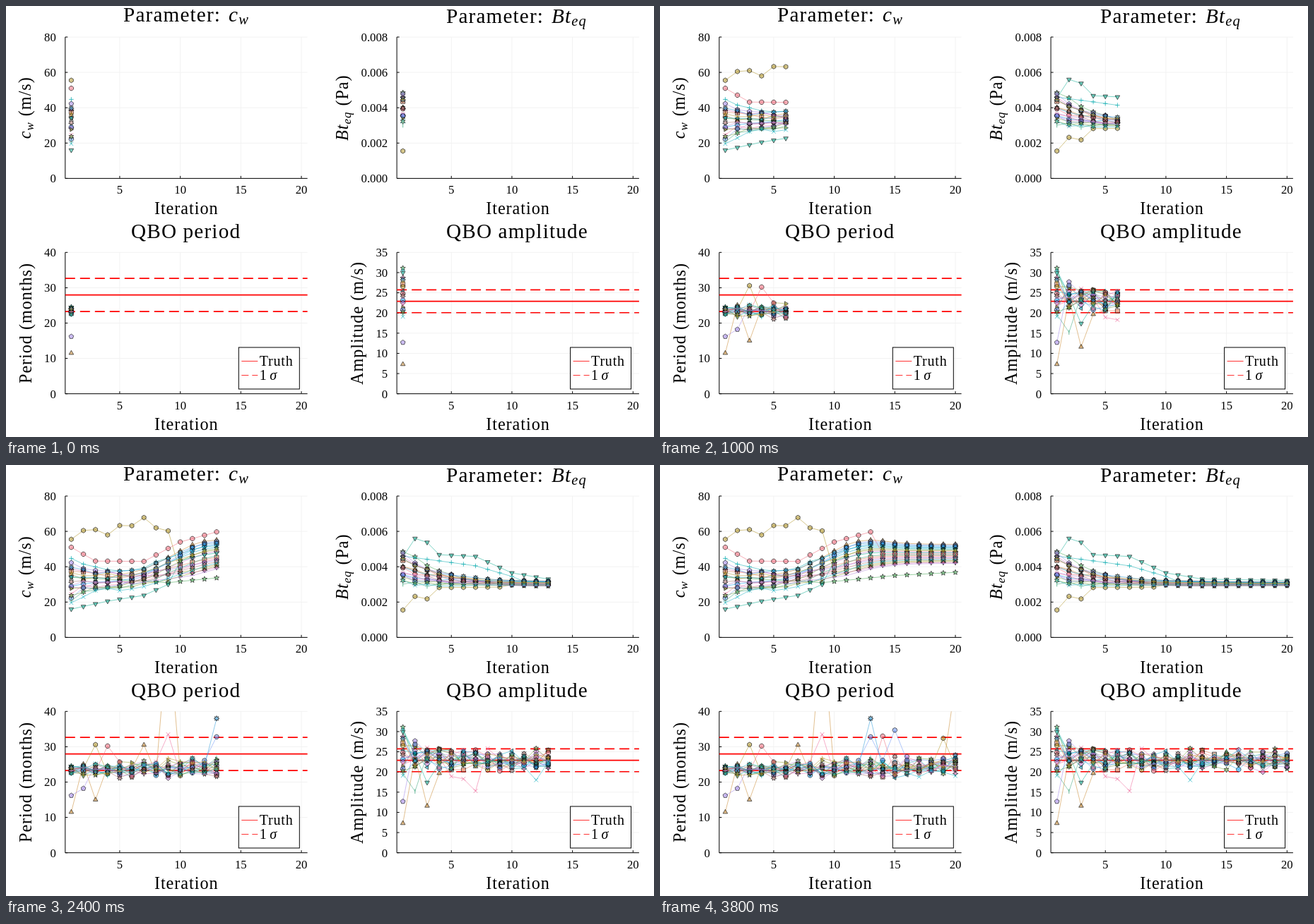
Write an HTML page that moves like this. It is 917x611 px and loops after 5800 ms.

```html
<!DOCTYPE html>
<html lang="en">
<head>
<meta charset="utf-8">
<title>Ensemble calibration</title>
<style>
html, body { margin: 0; width: 100%; height: 100%; overflow: hidden; background: #fff; }
svg { display: block; width: 917px; height: 611px; }
text { font-family: "Liberation Serif", serif; fill: #000; letter-spacing: .04em; }
.title { font-size: 29.2px; }
.label { font-size: 24.2px; text-anchor: middle; }
.tick { font-size: 16.7px; letter-spacing: 0; }
.legend { font-size: 20px; }
.math { font-style: italic; }
.sub { font-style: italic; font-size: .7em; }
</style>
</head>
<body>
<svg id="stage" viewBox="0 0 917 611"></svg>
<script>
const NS = 'http://www.w3.org/2000/svg';
const stage = document.getElementById('stage');
const STEPS = 20, STEP_MS = 200, LOOP_MS = 5800;
const W = 342.8, H = 200.4, LEFT = 83.8, RIGHT = 553.1, TOP = 44, LOW = 349.3;
const { PI, exp, min, max } = Math;

const clamp = v => min(1, max(0, v));
const ease = t => (t = clamp(t)) * t * (3 - 2 * t);
const decay = (n, rate) => exp((1 - n) / rate);

function polygon(count, r, turn = 0, inner = 1) {
  const total = inner < 1 ? count * 2 : count;
  return (x, y) => {
    const points = Array.from({ length: total }, (_, i) => {
      const a = turn - PI / 2 + i * 2 * PI / total;
      const q = i % 2 ? r * inner : r;
      return [(x + q * Math.cos(a)).toFixed(2), (y + q * Math.sin(a)).toFixed(2)];
    });
    return 'M' + points.join('L') + 'Z';
  };
}
const star = (count, inner) => polygon(count, 3.8, 0, inner);
const vbar = (x, y) => `M${x} ${y - 3.3}v6.6`;
const hbar = (x, y) => `M${x - 3.3} ${y}h6.6`;
const plus = (x, y) => vbar(x, y) + hbar(x, y);
const cross = (x, y) => `M${x - 2.8} ${y - 2.8}l5.6 5.6M${x - 2.8} ${y + 2.8}l5.6 -5.6`;
const open = [vbar, hbar, plus, cross];

const members = [
  ['circle', '#009af9', polygon(20, 3.3)],
  ['square', '#e26f46', polygon(4, 4.2, PI / 4)],
  ['star5', '#3da44d', star(5, .45)],
  ['diamond', '#c271d2', polygon(4, 3.7)],
  ['hexagon', '#ac8d18', polygon(6, 3.4)],
  ['plus', '#00a9ad', plus],
  ['cross', '#ed5e93', cross],
  ['up', '#c68225', polygon(3, 3.8)],
  ['down', '#00a98d', polygon(3, 3.8, PI)],
  ['right', '#8e971d', polygon(3, 3.3, PI / 2)],
  ['left', '#00a8cb', polygon(3, 3.3, -PI / 2)],
  ['pentagon', '#9b7fe9', polygon(5, 3.5)],
  ['heptagon', '#618df6', polygon(7, 3.4)],
  ['octagon', '#f06073', polygon(8, 3.4, PI / 8)],
  ['star4', '#dd64b5', star(4, .4)],
  ['star6', '#6b9e32', star(6, .5)],
  ['star7', '#b06e6c', star(7, .5)],
  ['star8', '#1f93d8', star(8, .5)],
  ['vbar', '#30a075', vbar],
  ['hbar', '#b584d6', hbar],
  ['plus2', '#b3902a', plus],
  ['cross2', '#16b0bf', cross]
];

// mid and half describe the ensemble's spread at step n.
// tracks: key points of stray paths; spikes: single stray values.
const panels = [
  {
    x: LEFT, y: TOP, top: 80, step: 20, format: v => v, seed: 11, smooth: true,
    title: 'Parameter:', titleAt: [166, 22], math: ['c', 'w'], unit: '(m/s)', labelX: 35,
    mid: n => 33 + 14 * ease((n - 5) / 9),
    half: n => 5.7 + 6.5 * decay(n, 1.2) + 4 * exp(-(((n - 11) / 3.5) ** 2)),
    tracks: {
      hexagon: { 1: 55.5, 2: 60.5, 3: 61, 4: 58, 5: 63.3, 6: 63.2, 7: 67.8, 8: 62, 9: 60.3 },
      down: { 1: 16, 4: 20.5, 7: 23.8, 9: 30 },
      octagon: { 1: 51, 3: 43.2, 7: 43, 10: 54, 13: 59.7 },
      star5: { 1: 34, 9: 31, 15: 35, 20: 36.8 }
    }
  },
  {
    x: RIGHT, y: TOP, top: 8, step: 2, format: v => (v / 1000).toFixed(3), seed: 23, smooth: true,
    title: 'Parameter:', titleAt: [623, 24], math: ['Bt', 'eq'], unit: '(Pa)', labelX: 484,
    mid: n => 3.03 + decay(n, 3),
    half: n => .1 + .85 * decay(n, 4),
    tracks: {
      hexagon: { 1: 1.55, 2: 2.32, 3: 2.18, 4: 2.82, 9: 2.85 },
      down: { 1: 4.55, 2: 5.6, 3: 5.38, 4: 4.68, 7: 4.58, 10: 3.65, 13: 3.3, 20: 3.22 },
      plus: { 1: 4.6, 4: 4.33, 7: 4.05, 10: 3.45 }
    }
  },
  {
    x: LEFT, y: LOW, top: 40, step: 10, format: v => v, seed: 5,
    title: 'QBO period', titleAt: [177, 329], label: 'Period (months)', labelX: 36,
    truth: 27.95, sigma: 4.7,
    mid: n => 23.4 + .06 * n,
    half: n => 3.3 - 2.2 * decay(n, 2),
    spikes: {
      up: { 1: 11.5, 3: 15, 7: 30.5, 9: 64, 20: 48 },
      pentagon: { 1: 16.2, 2: 18.2 },
      hexagon: { 3: 30.6, 19: 32.4 },
      octagon: { 4: 30.2, 14: 33 },
      cross: { 9: 33.5 },
      heptagon: { 13: 32.8, 15: 34.7 },
      star8: { 13: 38 }
    }
  },
  {
    x: RIGHT, y: LOW, top: 35, step: 5, format: v => v, seed: 41,
    title: 'QBO amplitude', titleAt: [623, 329], label: 'Amplitude (m/s)', labelX: 505,
    truth: 22.9, sigma: 2.82,
    mid: n => 22.9 + 2.2 * decay(n, 1.5),
    half: n => 3 + 3 * decay(n, 2.5),
    spikes: {
      up: { 1: 7.3, 3: 11.6 },
      pentagon: { 1: 12.7 },
      cross: { 5: 18.9, 6: 18.3, 7: 15.3 },
      down: { 3: 17.4 },
      vbar: { 2: 15.2 },
      cross2: { 12: 18 }
    }
  }
];

function add(parent, tag, attrs, content = '') {
  const el = document.createElementNS(NS, tag);
  for (const key in attrs) el.setAttribute(key, attrs[key]);
  el.textContent = content;
  return parent.appendChild(el);
}

function line(parent, x1, y1, x2, y2, stroke, width = 1, dash = 'none') {
  add(parent, 'line', { x1, y1, x2, y2, stroke, 'stroke-width': width, 'stroke-dasharray': dash });
}

function symbol(text, [main, sub], attrs = {}) {
  add(text, 'tspan', { class: 'math', ...attrs }, main);
  add(text, 'tspan', { class: 'sub', dy: '.22em' }, sub);
}

function random(seed) {
  return () => {
    seed = seed + 0x6d2b79f5 | 0;
    let t = Math.imul(seed ^ seed >>> 15, 1 | seed);
    t = t + Math.imul(t ^ t >>> 7, 61 | t) ^ t;
    return ((t ^ t >>> 14) >>> 0) / 4294967296;
  };
}

// Linear value between key points, undefined after the last one.
function follow(track, n) {
  const keys = Object.keys(track).map(Number);
  const next = keys.find(k => k >= n);
  if (next === undefined || next === n) return track[next];
  const prev = keys[keys.indexOf(next) - 1];
  return track[prev] + (track[next] - track[prev]) * (n - prev) / (next - prev);
}

function valuesOf(panel, m, rnd) {
  const name = members[m][0], count = members.length;
  const first = (m * 7 + 7) % count / (count - 1);
  const last = (m * 13 + 18) % count / (count - 1);
  const track = panel.tracks?.[name] ?? {}, spikes = panel.spikes?.[name] ?? {};
  return Array.from({ length: STEPS }, (_, k) => {
    const n = k + 1, noise = rnd();
    let rank = n === 1 ? first : .6 * noise + .4 * rnd();
    if (panel.smooth) {
      const t = ease((n - 2) / 11);
      rank = first + (last - first) * t + (noise - .5) * .2 * (1 - t);
    }
    return follow(track, n) ?? spikes[n] ?? panel.mid(n) + panel.half(n) * (2 * rank - 1);
  });
}

const series = [];

function drawPanel(p, index) {
  const right = p.x + W, bottom = p.y + H;
  const px = n => p.x + (n - .5) * W / STEPS;
  const py = v => bottom - v / p.top * H;
  const g = add(stage, 'g');

  for (let n = 5; n <= STEPS; n += 5) {
    line(g, px(n), p.y, px(n), bottom, '#f2f2f2');
    line(g, px(n), bottom, px(n), bottom - 3.5, '#000');
    add(g, 'text', { class: 'tick', x: px(n), y: bottom + 22, 'text-anchor': 'middle' }, n);
  }
  for (let v = 0; v <= p.top; v += p.step) {
    line(g, p.x, py(v), right, py(v), '#f2f2f2');
    line(g, p.x, py(v), p.x + 3.5, py(v), '#000');
    add(g, 'text', { class: 'tick', x: p.x - 13, y: py(v) + 5.8, 'text-anchor': 'end' }, p.format(v));
  }
  line(g, p.x, bottom, right, bottom, '#000');
  line(g, p.x, p.y, p.x, bottom, '#000');

  const [x, y] = p.titleAt;
  const title = add(g, 'text', { class: 'title', x, y }, p.title);
  add(g, 'text', { class: 'label', x: p.x + W / 2, y: bottom + 51 }, 'Iteration');
  const label = add(g, 'text', { class: 'label',
    transform: `translate(${p.labelX} ${p.y + H / 2}) rotate(-90)` }, p.label);
  if (p.math) {
    symbol(title, p.math, { x: x + 149 });
    symbol(label, p.math);
    add(label, 'tspan', { dy: '-.154em', dx: '.33em' }, p.unit);
  }

  if (p.truth) {
    for (const k of [-1, 0, 1]) {
      const level = py(p.truth + k * p.sigma);
      line(g, p.x, level, right, level, '#f00', 1.7, k ? '14 7' : 'none');
    }
  }

  const clip = add(stage, 'clipPath', { id: 'area' + index });
  add(clip, 'rect', { x: p.x, y: p.y, width: W, height: H });
  const plot = add(g, 'g', { 'clip-path': `url(#area${index})` });
  const rnd = random(p.seed);
  members.forEach(([, color, shape], m) => {
    const points = valuesOf(p, m, rnd).map((v, k) => [+px(k + 1).toFixed(2), +py(v).toFixed(2)]);
    const path = add(plot, 'path', { fill: 'none', stroke: color, 'stroke-opacity': .5 });
    const marks = add(plot, 'path', open.includes(shape)
      ? { fill: 'none', stroke: color, 'stroke-opacity': .7 }
      : { fill: color, 'fill-opacity': .5, stroke: '#000', 'stroke-opacity': .6 });
    series.push({ path, marks, points, dots: points.map(([x, y]) => shape(x, y)) });
  });

  if (p.truth) drawLegend(g, p.x + 245.5);
}

function drawLegend(g, x) {
  add(g, 'rect', { x, y: 484, width: 86, height: 59, fill: '#fff', stroke: '#000' });
  line(g, x + 4, 503.5, x + 27, 503.5, '#f00', .8);
  line(g, x + 4, 523.5, x + 27, 523.5, '#f00', .8, '10 5');
  add(g, 'text', { class: 'legend', x: x + 29.5, y: 510 }, 'Truth');
  const text = add(g, 'text', { class: 'legend', x: x + 29.5, y: 530 }, '1');
  add(text, 'tspan', { class: 'math', x: x + 44 }, 'σ');
}

panels.forEach(drawPanel);

let shown = 0;
function render(ms) {
  const count = min(STEPS, Math.floor(ms % LOOP_MS / STEP_MS) + 1);
  if (count === shown) return;
  shown = count;
  for (const { path, marks, points, dots } of series) {
    path.setAttribute('d', 'M' + points.slice(0, count).join('L'));
    marks.setAttribute('d', dots.slice(0, count).join(''));
  }
}

const start = performance.now();
function tick() {
  render(performance.now() - start);
  requestAnimationFrame(tick);
}
tick();
</script>
</body>
</html>
```
